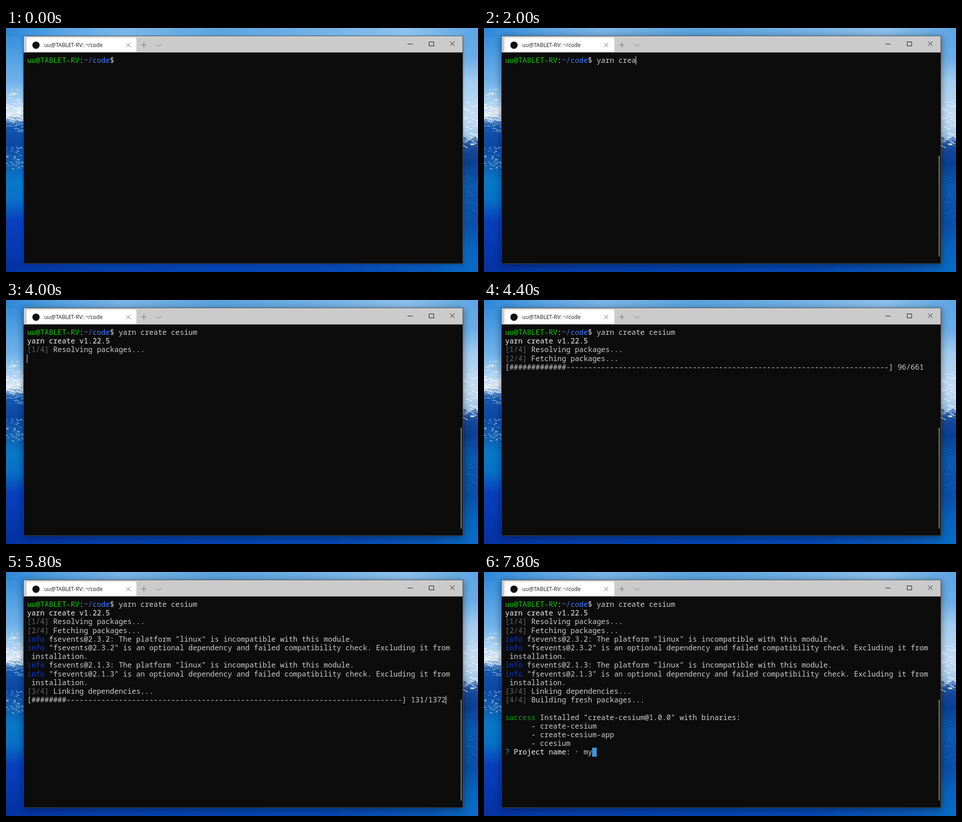
Recreate the animation shown at these times as an HTML page with a canvas. Size 1039 by 539 pixels, loop 8000 ms.

```html
<!DOCTYPE html>
<html lang="en">
<head>
<meta charset="utf-8">
<title>Terminal</title>
<style>
  html, body { margin: 0; width: 100%; height: 100%; overflow: hidden; background: #0a4fb4; }
  canvas, svg, #window, #tab, #title, #scroll, .row { position: absolute; }
  canvas, svg { left: 0; top: 0; }
  #window {
    left: 38px; top: 17px; width: 966px; height: 502px;
    border: 1px solid #3f4a55;
    background: linear-gradient(#cbcbcb 36px, #0c0c0c 36px);
    box-shadow: 0 2px 6px rgba(0, 0, 0, .25);
  }
  #window.active { box-shadow: 0 3px 16px rgba(0, 0, 0, .45); }
  #tab { left: 45px; top: 21px; width: 242px; height: 32px; border-radius: 4px 4px 0 0; background: #fff; }
  #title { left: 84px; top: 28px; font: 12px/20px "Open Sans", sans-serif; color: #1a1a1a; white-space: pre; }
  #scroll { left: 1001px; top: 282px; width: 2px; height: 223px; background: #8c8c8c; }
  .row {
    left: 46.4px; height: 19.2px; white-space: pre; color: #ccc;
    font: 16px/19.2px "Noto Sans Mono", "DejaVu Sans Mono", monospace;
    font-variant-ligatures: none;
  }
  .row b { font-weight: normal; }
  .user { color: #16c60c; }
  .path { color: #3b78ff; }
  .bright { color: #f2f2f2; }
  .dim { color: #666; }
  .info { color: #0037da; }
  .ok { color: #13a10e; }
  .ask { color: #3a96dd; }
  .block { display: inline-block; height: 19.2px; vertical-align: top; background: #3a96dd; color: #0c0c0c; }
  .row u { position: absolute; top: 0; width: 1px; height: 19px; background: #fff; }
</style>
</head>
<body>
<canvas id="sea" width="1039" height="539"></canvas>
<div id="window"></div>
<div id="tab"></div>
<div id="title">uu@TABLET-RV: ~/code</div>
<svg width="1039" height="539" fill="none" stroke="#666">
  <circle cx="66" cy="38" r="8" fill="#111" stroke="none"/>
  <path d="M264.5 33.5l9 9m0-9l-9 9"/>
  <path d="M297 37.5h12M303.5 31v13M331 35.5l5.5 5.5 5.5-5.5"/>
  <path stroke="#000" d="M884 35.5h11M931.5 30.5h10v9h-10zM977.5 29.5l10 10m0-10l-10 10"/>
</svg>
<div id="screen"></div>
<div id="scroll"></div>

<script>
const LOOP = 8000;
const el = id => document.getElementById(id);

// Wallpaper: sky, foam and water around the window
const ctx = el('sea').getContext('2d');
let seed = 7;
const random = () => (seed = seed * 16807 % 2147483647) / 2147483647;

function strip(x, y, w, h, stops) {
  const wide = w > h;
  const paint = ctx.createLinearGradient(x, y, wide ? x + w : x, wide ? y : y + h);
  stops.forEach(([at, color]) => paint.addColorStop(at, color));
  ctx.fillStyle = paint;
  ctx.fillRect(x, y, w, h);
}

function flecks(x, y, w, h, count, size, color) {
  ctx.strokeStyle = color;
  for (let i = 0; i < count; i++) {
    const px = x + random() * w, py = y + random() * h, len = size * (.3 + random());
    ctx.lineWidth = .6 + random() * 1.4;
    ctx.beginPath();
    ctx.moveTo(px, py);
    ctx.lineTo(px + len, py + len * (random() * .8 - .2));
    ctx.stroke();
  }
}

strip(0, 0, 60, 539, [[0, '#2f87d8'], [.1, '#4c9ce2'], [.22, '#70b2ea'], [.3, '#a9d0f2'], [.35, '#d4e6f6'],
  [.4, '#1458ae'], [.48, '#0a48a4'], [.56, '#1260b4'], [.63, '#0878c8'], [.7, '#0872c8'], [.79, '#0840bc'], [1, '#0432a4']]);
strip(980, 0, 59, 539, [[0, '#5ba5e2'], [.12, '#68ade6'], [.22, '#a4cdf0'], [.36, '#c3ddf3'], [.44, '#a6c9ea'],
  [.48, '#1b519c'], [.55, '#0a3f90'], [.65, '#0a58ac'], [.8, '#0a4ea6'], [.9, '#0864bc'], [1, '#0a6cc4']]);
strip(0, 0, 1039, 18, [[0, '#2f87d8'], [.12, '#58a4e4'], [.25, '#7ab6e8'], [.45, '#5ba4e0'], [.65, '#70b0e6'],
  [.85, '#8cc2ee'], [1, '#5ba5e2']]);
strip(0, 520, 1039, 19, [[0, '#0432a4'], [.2, '#0640ac'], [.45, '#0444b4'], [.7, '#0648b4'], [.9, '#0858b8'], [1, '#0a6cc4']]);
flecks(-6, 130, 44, 42, 20, 9, '#dcecfa');
flecks(-6, 170, 44, 34, 80, 9, '#f4f9fd');
flecks(-6, 198, 44, 30, 30, 8, '#7fb0dc');
flecks(-4, 262, 42, 50, 70, 4, '#8fbce2');
flecks(1006, 160, 33, 80, 40, 9, '#e4f0fa');
flecks(1006, 236, 33, 24, 30, 9, '#d0e2f4');
flecks(1006, 240, 33, 48, 30, 9, '#0b3f8c');
flecks(1006, 300, 33, 130, 25, 9, '#1b68b4');

// Terminal text
const span = (name, text) => `<b class="${name}">${text}</b>`;
const PROMPT = span('user', 'uu@TABLET-RV') + ':' + span('path', '~/code') + '$ ';
const COMMAND = 'yarn create cesium';
const KEYS = [1000, 1000, 1100, 1200, 1300, 1400, 1700, 1800, 2000, 2300, 2300, 2700, 2900,
  3100, 3300, 3300, 3400, 3700];
const CURSOR_OFF = [[0, 200], [700, 1000], [4200, 4800], [5400, 5800]];

const step = (n, text) => span('dim', `[${n}/4]`) + ` ${text}...`;
const incompatible = version => [
  span('info', 'info') + ` fsevents@${version}: The platform "linux" is incompatible with this module.`,
  span('info', 'info') + ` "fsevents@${version}" is an optional dependency and failed compatibility check. Excluding it from`,
  ' installation.'
];

function bar(n, total) {
  const width = 93 - 2 * String(total).length;
  const filled = Math.round(width * n / total);
  return `[${'#'.repeat(filled)}${'-'.repeat(width - filled)}] ${n}/${total}`;
}

// Last line while the command is working
const LIVE = [
  [3800, ''], [4100, '⠁ '], [4200, '⠂ '],
  [4300, bar(41, 661)], [4400, bar(96, 661)], [4500, bar(99, 661)], [4600, bar(385, 661)], [4700, ''],
  [4800, bar(0, 1372)], [4900, bar(131, 1372)], [6100, bar(512, 1372)], [6200, bar(938, 1372)], [6300, '']
];

function answer(t) {
  if (t < 7400) return span('block', 'c') + span('dim', 'esium-project');
  return (t < 7800 ? 'm' : 'my') + span('block', ' ');
}

function rowsAt(t) {
  const rows = [PROMPT + COMMAND.slice(0, KEYS.filter(key => key <= t).length)];
  const add = (time, ...lines) => { if (t >= time) rows.push(...lines); };
  add(3900, span('bright', 'yarn create v1.22.5'));
  add(4000, step(1, 'Resolving packages'));
  add(4300, step(2, 'Fetching packages'));
  add(4700, ...incompatible('2.3.2'), ...incompatible('2.1.3'), step(3, 'Linking dependencies'));
  add(6400, step(4, 'Building fresh packages'), '',
    span('ok', 'success') + ' Installed "create-cesium@1.0.0" with binaries:',
    ...['create-cesium', 'create-cesium-app', 'ccesium'].map(name => '      - ' + name),
    `${span('ask', '?')} ${span('bright', 'Project name:')} ${span('dim', '‣')} ${answer(t)}`);
  if (t < 6400) {
    const live = LIVE.filter(([time]) => time <= t).pop();
    if (live) rows.push(live[1]);
    if (!CURSOR_OFF.some(([from, to]) => t >= from && t < to)) rows[rows.length - 1] += '<u></u>';
  }
  return rows;
}

let shown;
function draw() {
  const t = performance.now() % LOOP;
  const html = rowsAt(t).map((row, i) => `<div class="row" style="top:${(62 + i * 19.2).toFixed(1)}px">${row}</div>`).join('');
  if (html !== shown) el('screen').innerHTML = shown = html;
  el('window').classList.toggle('active', t >= 200);
  el('scroll').hidden = t < 2000;
  requestAnimationFrame(draw);
}
draw();
</script>
</body>
</html>
```
